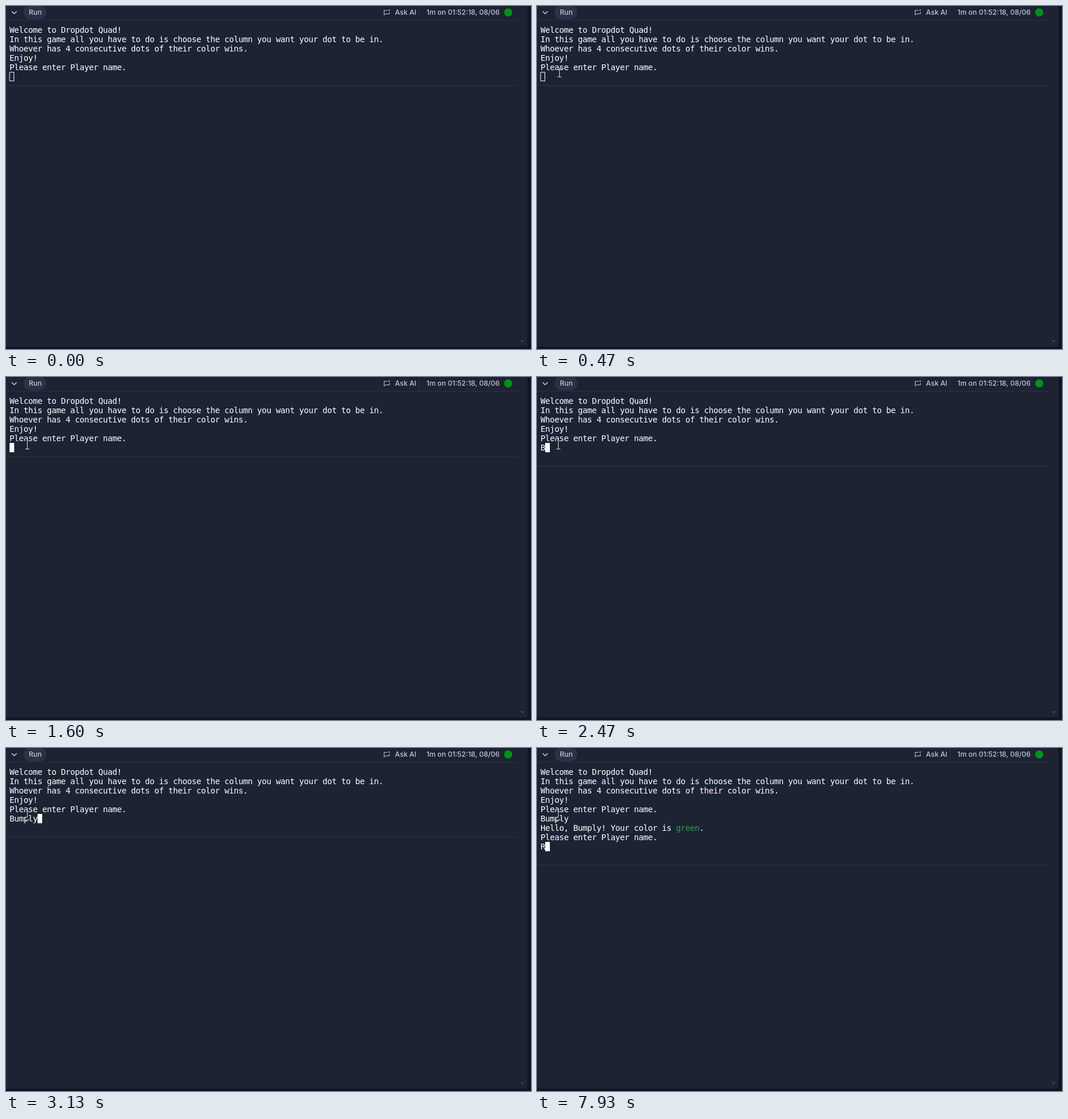
Write an HTML page with a canvas that moves like this. It is 899 px wide and 588 px high and loops after 8000 ms.

```html
<!DOCTYPE html>
<html lang="en">
<head>
<meta charset="utf-8">
<title>Terminal game</title>
<style>
  html, body { margin: 0; width: 100%; height: 100%; overflow: hidden; background: #0e1525; }
  canvas { display: block; }
</style>
</head>
<body>
<canvas id="stage" width="899" height="588"></canvas>
<script>
const ctx = document.getElementById('stage').getContext('2d');
const LOOP = 8000;
const CELL_W = 8, CELL_H = 16, LEFT = 6, TOP = 33;
const PANEL = '#1c2333', LINE = '#2b3245', TEXT = '#ffffff', LABEL = '#c2c8cc', GREEN = '#2ba143';
const PLAYER = 'Bumply';

const intro = [
  'Welcome to Dropdot Quad!',
  'In this game all you have to do is choose the column you want your dot to be in.',
  'Whoever has 4 consecutive dots of their color wins.',
  'Enjoy!',
  'Please enter Player name.'
];
const keyTimes = [2470, 2670, 2800, 2930, 3000, 3130];
const FOCUS = 1130, ENTER = 3400, SECOND_KEY = 7930;

// Pointer steps: time, centre x, top y
const pointerSteps = [
  [70, 893, 573], [130, 700, 455], [200, 470, 320], [270, 280, 220],
  [330, 150, 160], [400, 70, 122], [470, 38, 107], [530, 31, 94],
  [730, 32, 98], [800, 34, 104], [870, 35, 108], [930, 34, 107], [1600, 36, 109]
];

function rect(x, y, w, h, color) {
  ctx.fillStyle = color;
  ctx.fillRect(x, y, w, h);
}

function stroke(path, color, width) {
  ctx.strokeStyle = color;
  ctx.lineWidth = width;
  ctx.stroke(new Path2D(path));
}

function label(text, x) {
  ctx.font = '500 12px Inter, sans-serif';
  ctx.fillStyle = LABEL;
  ctx.fillText(text, x, 15);
}

function rounded(x, y, w, h, radii, color) {
  ctx.fillStyle = color;
  ctx.beginPath();
  ctx.roundRect(x, y, w, h, radii);
  ctx.fill();
}

function write(text, row, col = 0, color = TEXT) {
  ctx.font = '14px "DejaVu Sans Mono", monospace';
  ctx.fillStyle = color;
  [...text].forEach((ch, i) =>
    ctx.fillText(ch, LEFT + (col + i) * CELL_W, TOP + row * CELL_H + 13));
}

function drawPanel() {
  rect(0, 0, 899, 588, '#0e1525');
  rounded(-8, -8, 901, 592, [0, 0, 4, 0], PANEL);
  rect(0, 24, 876, 1, LINE);
  rect(707, 0, 1, 24, LINE);

  ctx.lineCap = ctx.lineJoin = 'round';
  stroke('M10 9.5 L14 13.2 L18 9.5', '#e1e5e9', 1.2);
  rounded(30, -1, 39, 24, 12, '#2b3245');
  label('Run', 39);
  stroke('M652.5 7.5 H647.5 V15.5 L650 13.5 H656.5 V10.5', LABEL, 1);
  rect(655, 6, 2, 2, LABEL);
  label('Ask AI', 666);
  label('1m on 01:52:18, 08/06', 720);

  ctx.fillStyle = '#009118';
  ctx.beginPath();
  ctx.arc(860, 11, 7, 0, Math.PI * 2);
  ctx.fill();

  ctx.fillStyle = '#3c445c';
  ctx.fill(new Path2D('M881 573 H888 L884.5 577 Z'));
}

function drawCaret(row, col, focused) {
  const x = LEFT + col * CELL_W, y = TOP + row * CELL_H;
  if (focused) {
    rect(x, y, CELL_W, CELL_H, TEXT);
  } else {
    ctx.strokeStyle = TEXT;
    ctx.lineWidth = 1;
    ctx.strokeRect(x + 0.5, y + 0.5, CELL_W - 1, CELL_H - 1);
  }
}

function drawTerminal(t) {
  intro.forEach((text, row) => write(text, row));
  const typed = keyTimes.filter(time => t >= time).length;
  write(PLAYER.slice(0, typed), 5);

  let row = 5, col = typed;
  if (t >= ENTER) {
    const greeting = `Hello, ${PLAYER}! Your color is `;
    write(greeting, 6);
    write('green', 6, greeting.length, GREEN);
    write('.', 6, greeting.length + 5);
    write(intro[4], 7);
    row = 8;
    col = t >= SECOND_KEY ? 1 : 0;
    if (col) write('R', row);
  }
  drawCaret(row, col, t >= FOCUS);
  rect(0, TOP + (row + (col ? 2 : 1)) * CELL_H + 7, 876, 1, LINE);
}

// The I-beam inverts whatever lies below it.
function drawPointer(t) {
  const step = pointerSteps.filter(([time]) => t >= time).pop();
  if (!step) return;
  const [, x, y] = step;
  ctx.globalCompositeOperation = 'difference';
  rect(x, y, 1, 15, '#fff');
  for (const serifY of [y, y + 14]) {
    rect(x - 3, serifY, 3, 1, '#fff');
    rect(x + 1, serifY, 3, 1, '#fff');
  }
  ctx.globalCompositeOperation = 'source-over';
}

const start = performance.now();
function frame() {
  const t = (performance.now() - start) % LOOP;
  drawPanel();
  drawTerminal(t);
  drawPointer(t);
  requestAnimationFrame(frame);
}
frame();
</script>
</body>
</html>
```
